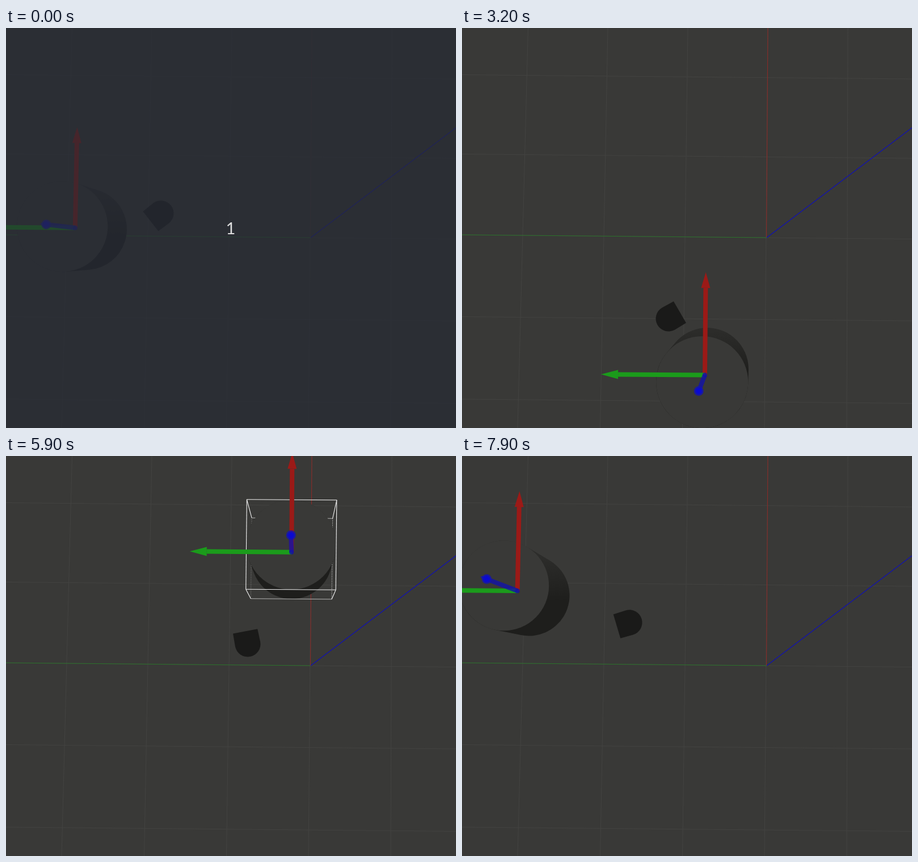
Write an HTML page with a canvas that moves like this. It is 793 px wide and 706 px high and loops after 8000 ms.

```html
<!DOCTYPE html>
<html lang="en">
<head>
<meta charset="utf-8">
<title>Follow the cylinder</title>
<style>
  html, body { margin: 0; width: 100%; height: 100%; overflow: hidden; background: #393937; }
  canvas { display: block; }
</style>
</head>
<body>
<canvas id="stage" width="793" height="706"></canvas>
<script>
const W = 793, H = 706, LOOP = 8000, STEP = 100;
const BG = '#393937';
const ctx = document.getElementById('stage').getContext('2d');

// Point under the camera: upright things lean away from it.
const EYE = { x: 510, y: 398 };

// Cylinder foot: time, x, y, easing into the key.
const dragKeys = [
  [1400, 141, 355], [2200, 432, 602, 'both'],
  [4300, 432, 602], [4900, 414, 340, 'in'], [5400, 503.5, 181, 'out'],
  [6500, 503.5, 181], [6800, 304, 236, 'in'], [7300, 118, 246, 'out'],
];
// Robot: time, x, y, heading in degrees.
const driveKeys = [
  [0, 273, 327, 142], [1400, 293, 417, 64], [3200, 364, 513, -30],
  [4900, 407, 401, -70], [5900, 426, 332, -101], [6800, 373, 305, -168],
  [7900, 295, 294, -196.5],
];
const ROBOT_SPEED = 0.068;

const ease = {
  in: u => u * u,
  out: u => u * (2 - u),
  both: u => u * u * (3 - 2 * u),
};
const within = (t, ...spans) => spans.some(([a, b]) => t >= a && t < b);
const mix = (a, b, u) => ({ x: a.x + (b.x - a.x) * u, y: a.y + (b.y - a.y) * u });

function segment(keys, t) {
  let i = 0;
  while (i < keys.length - 2 && t >= keys[i + 1][0]) i++;
  const a = keys[i], b = keys[i + 1];
  const u = Math.min(1, Math.max(0, (t - a[0]) / (b[0] - a[0])));
  return { a, b, u };
}

function cylinderFoot(t) {
  const { a, b, u } = segment(dragKeys, t);
  const e = b[3] ? ease[b[3]](u) : u;
  return mix({ x: a[1], y: a[2] }, { x: b[1], y: b[2] }, e);
}

// Hermite curve whose tangents are the headings.
function robotPose(t) {
  const { a, b, u } = segment(driveKeys, t);
  const reach = ROBOT_SPEED * (b[0] - a[0]);
  const rad = Math.PI / 180;
  const curve = (p, q, m, n) => {
    const c = 3 * (q - p) - 2 * m - n, d = 2 * (p - q) + m + n;
    return [p + u * (m + u * (c + u * d)), m + u * (2 * c + 3 * u * d)];
  };
  const [x, vx] = curve(a[1], b[1], reach * Math.cos(a[3] * rad), reach * Math.cos(b[3] * rad));
  const [y, vy] = curve(a[2], b[2], reach * Math.sin(a[3] * rad), reach * Math.sin(b[3] * rad));
  return { x, y, angle: Math.atan2(vy, vx) };
}

function line(x1, y1, x2, y2, color, width = 1) {
  ctx.strokeStyle = color;
  ctx.lineWidth = width;
  ctx.beginPath();
  ctx.moveTo(x1, y1);
  ctx.lineTo(x2, y2);
  ctx.stroke();
}

function polygon(points, color) {
  ctx.fillStyle = color;
  ctx.beginPath();
  points.forEach(p => ctx.lineTo(p.x, p.y));
  ctx.fill();
}

function disc(c, r, color) {
  ctx.fillStyle = color;
  ctx.beginPath();
  ctx.arc(c.x, c.y, r, 0, 2 * Math.PI);
  ctx.fill();
}

function drawGround(redIsFaint) {
  ctx.fillStyle = BG;
  ctx.fillRect(0, 0, W, H);
  const grid = '#434341';
  [[116.5, 98], [257, 243.5], [398, 388.5], [539, 533], [680, 678]]
    .forEach(([top, bottom]) => line(top, 0, bottom, H, grid));
  [82.5, 222.5, 365, 509.5, 655].forEach(y => line(0, y, W, y + 7.5, grid));
  line(539, 0, 536.5, 370, redIsFaint ? '#4b3634' : '#8f2926');
  line(0, 365, 537, 370, '#2b722b');
  line(537, 370, W, 176, '#1010b4', 1.3);
}

function drawRobot({ x, y, angle }) {
  ctx.save();
  ctx.translate(x, y);
  ctx.rotate(angle);
  ctx.fillStyle = '#1a1a19';
  ctx.beginPath();
  ctx.arc(0, 0, 22.5, Math.PI / 2, Math.PI * 1.5);
  ctx.lineTo(23, -22);
  ctx.lineTo(23, 22);
  ctx.fill();
  ctx.restore();
}

function boxCorners(c, r, lean) {
  return [[-1, -1], [1, -1], [1, 1], [-1, 1]]
    .map(([sx, sy]) => ({ x: c.x + sx * r - sy * lean, y: c.y + sy * r + sx * 0.5 }));
}

function drawSide(foot, top, rFoot, rTop) {
  const dx = foot.x - top.x, dy = foot.y - top.y;
  const cos = (rTop - rFoot) / Math.hypot(dx, dy);
  if (!(cos < 1)) return;
  const angle = Math.atan2(dy, dx), spread = Math.acos(cos);
  const shade = ctx.createLinearGradient(0, foot.y - rFoot, 0, foot.y + 10);
  shade.addColorStop(0, '#2d2d2b');
  shade.addColorStop(1, '#1e1e1c');
  ctx.fillStyle = shade;
  ctx.beginPath();
  ctx.arc(foot.x, foot.y, rFoot, angle - spread, angle + spread);
  ctx.arc(top.x, top.y, rTop, angle + spread, angle - spread + 2 * Math.PI);
  ctx.fill();
}

function drawCylinder(foot, held, selected) {
  const top = mix(EYE, foot, 1.113);
  const rTop = 78.6 + top.y * 0.004, rFoot = rTop * 0.9;
  const lean = 0.8 + (EYE.x - foot.x) * 0.003;
  const front = boxCorners(top, rTop, lean);
  const back = boxCorners(foot, rFoot, lean);
  const alpha = held ? 0.5 : 1;
  const edge = (p, q, color = '#f4f4f4') => line(p.x, p.y, q.x, q.y, color, 1.1);

  ctx.globalAlpha = alpha;
  drawSide(foot, top, rFoot, rTop);
  ctx.globalAlpha = 1;
  if (selected) {
    edge(back[0], back[1], '#b4b4b3');
    edge(back[3], back[2], '#b4b4b3');
    ctx.setLineDash([1, 2]);
    edge(back[1], back[2]);
    edge(back[0], back[3], '#8c8c8b');
    ctx.setLineDash([]);
    front.forEach((p, i) => edge(p, back[i]));
  }
  ctx.globalAlpha = alpha;
  disc(top, rTop, BG);
  ctx.globalAlpha = 1;
  if (selected) front.forEach((p, i) => edge(p, front[(i + 1) % 4]));
  drawGizmo(mix(foot, top, 0.46));
}

function drawArrow(from, to, head, color) {
  const length = Math.hypot(to.x - from.x, to.y - from.y);
  ctx.save();
  ctx.translate(from.x, from.y);
  ctx.rotate(Math.atan2(to.y - from.y, to.x - from.x));
  ctx.fillStyle = color;
  ctx.fillRect(0, -4, length - head, 8);
  ctx.beginPath();
  ctx.moveTo(length, 0);
  ctx.lineTo(length - head, -8);
  ctx.lineTo(length - head, 8);
  ctx.fill();
  ctx.restore();
}

function drawGizmo(o) {
  const up = 177 + (o.y - 300) * 0.015;
  drawArrow(o, { x: o.x + 1.3 + (503 - o.x) * 0.006, y: o.y - up }, 28, '#9b1a17');
  drawArrow(o, { x: o.x - 178 - o.y * 0.008, y: o.y - 1.4 }, 30, '#1b9b1b');

  const ball = mix(EYE, o, 1.131), tip = mix(EYE, o, 1.158);
  const dx = ball.x - o.x, dy = ball.y - o.y, d = Math.hypot(dx, dy) || 1;
  const side = { x: -dy / d * 8, y: dx / d * 8 };
  ctx.globalAlpha = 0.82;
  line(o.x, o.y, ball.x, ball.y, '#1414a6', 8);
  disc(o, 4, '#1414a6');
  polygon([
    { x: ball.x + side.x, y: ball.y + side.y }, tip,
    { x: ball.x - side.x, y: ball.y - side.y },
  ], '#1414b4');
  disc(ball, 8.5, '#1414b4');
  disc(ball, 5.5, '#0808d8');
  ctx.globalAlpha = 1;
}

function drawCountdown(t) {
  const fade = 1 - t / 300;
  if (fade <= 0) return;
  ctx.globalAlpha = 0.72 * fade;
  ctx.fillStyle = 'rgb(38, 42, 52)';
  ctx.fillRect(0, 0, W, H);
  ctx.globalAlpha = fade;
  ctx.fillStyle = '#dedede';
  ctx.font = '29px Lato, sans-serif';
  ctx.textAlign = 'center';
  ctx.fillText('1', 396, 363.5);
  ctx.globalAlpha = 1;
}

function draw(t) {
  const selected = within(t, [1400, 2400], [4300, 6100], [6500, 7600]);
  const held = within(t, [1500, 2300], [4400, 5400], [6600, 7400]);
  drawGround(within(t, [0, 2400], [4300, 5400], [6500, 7600]));
  drawRobot(robotPose(t));
  drawCylinder(cylinderFoot(t), held, selected);
  drawCountdown(t);
}

function tick() {
  const t = performance.now() % LOOP;
  draw(Math.floor(t / STEP) * STEP);
  requestAnimationFrame(tick);
}
tick();
</script>
</body>
</html>
```
